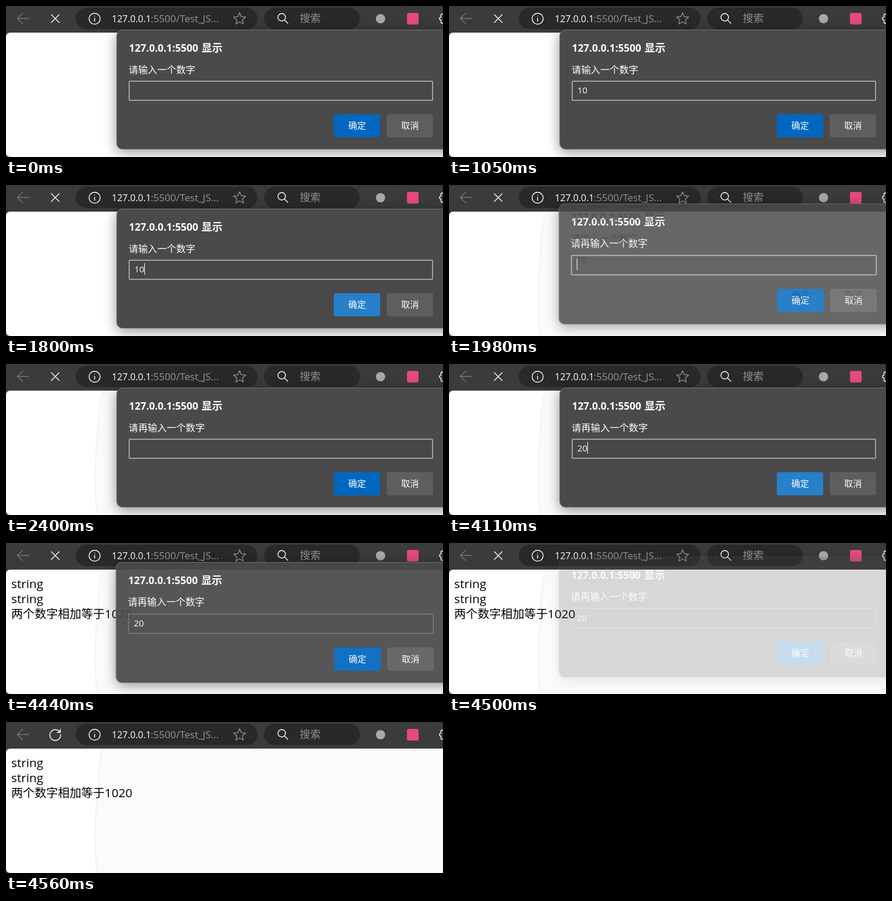
These frames come from a looping animation (752x261 px, 6 s). An HTML page:

```html
<!DOCTYPE html>
<html lang="zh">
<head>
<meta charset="utf-8">
<title>Prompt demo</title>
<style>
  html, body { margin: 0; width: 100%; height: 100%; overflow: hidden; background: #3b3b3b; }
  svg { display: block; width: 752px; height: 261px; }
  text { font-family: "Open Sans", "Noto Sans CJK SC", "Noto Sans CJK", sans-serif; white-space: pre; }
  .icon { fill: none; stroke: #fff; stroke-width: 1.4; stroke-linecap: round; stroke-linejoin: round; }
  .dim { stroke: #777; }
  .dialog { fill: #fff; transform-origin: 473px 144px; }
  .panel { fill: #4a4a4a; stroke: #747474; filter: drop-shadow(0 5px 11px rgba(0, 0, 0, .42)); }
  .field { fill: #474747; stroke: #9da0a6; stroke-width: 2; }
  .blurred .field { stroke: #747474; stroke-width: 1.5; }
  .cancel { fill: #5e5e5e; }
  .ghost { fill: #000; }
  .ghost :is(.panel, .field, .button) { display: none; }
</style>
</head>
<body>
<svg viewBox="0 0 752 261">
  <rect width="752" height="261" fill="#3b3b3b"/>
  <g fill="#292929">
    <rect x="120" y="3" width="313" height="37" rx="18.5"/>
    <rect x="444" y="3" width="165" height="37" rx="18.5"/>
  </g>
  <path class="icon dim" d="M39 21.5H20M28.500 12.500L19.500 21.500L28.500 30.500"/>
  <path class="icon" id="stop" d="M78 15L91.500 28.500M91.500 15L78 28.500"/>
  <path class="icon" id="reload" d="M92.500 17.500A9.300 9.300 0 1 0 94 22M93.500 12.500V18H88"/>
  <circle class="icon" cx="152.500" cy="22" r="9.500"/>
  <path class="icon" d="M152.500 21V26.500M152.500 17.500V17.600"/>
  <text x="182" y="28" font-size="16" fill="#fff">127.0.0.1</text>
  <text x="249" y="28" font-size="17.1" fill="#969696">:5500/Test_JS...</text>
  <path class="icon" id="star" style="stroke:#999;stroke-width:1.3"/>
  <circle class="icon" cx="474.500" cy="19.500" r="6.500"/>
  <path class="icon" d="M479.300 24.300L485 30"/>
  <text x="505.500" y="28" font-size="18" fill="#919191">搜索</text>
  <circle cx="644.500" cy="22" r="8" fill="#a8a8a8"/>
  <rect x="690" y="12" width="20" height="20" rx="3" fill="#e6487f"/>
  <path class="icon" d="M753 14H750Q748.500 14 748.500 16V19Q745.500 20 746 22Q746 24 748.500 24.500V28Q748.500 30 751 30H753"/>

  <path d="M0 54Q0 46 8 46H752V261H8Q0 261 0 253Z" fill="#fff"/>
  <path id="tint" d="M168 47C158 62 160 100 156 140S152 230 158 264H756V47" fill="#fbfbfb" stroke="#f5f5f5" stroke-width="3"/>
  <g id="output" font-size="20.8">
    <text x="9" y="77.500">string</text>
    <text x="9" y="103.500">string</text>
    <text x="9" y="129.500"><tspan font-size="20.100">两个数字相加等于</tspan>1020</text>
  </g>
  <g id="dialogs"></g>
</svg>
<script>
const LOOP = 6000, STEP = 30;
const $ = id => document.getElementById(id);
const show = (node, on) => { node.style.display = on ? '' : 'none'; };

$('star').setAttribute('d', 'M' + Array.from({ length: 10 }, (_, i) => {
  const angle = (i / 5 - 0.5) * Math.PI, r = i % 2 ? 5 : 10.8;
  return `${402 + r * Math.cos(angle)} ${22.5 + r * Math.sin(angle)}`;
}).join('L') + 'Z');

function makeDialog(message) {
  const root = document.createElementNS('http://www.w3.org/2000/svg', 'g');
  root.setAttribute('class', 'dialog');
  root.innerHTML = `
    <rect class="panel" x="190.5" y="41.5" width="580" height="206" rx="10"/>
    <text x="211.5" y="79" font-size="17.4" font-weight="700">127.0.0.1:5500 <tspan x="336.5" font-size="18">显示</tspan></text>
    <text x="211" y="115.500" font-size="16.4">${message}</text>
    <rect class="field" x="212" y="130" width="522" height="33" rx="1.5"/>
    <text class="value" x="221" y="151" font-size="15"></text>
    <rect class="caret" y="135" width="1" height="20"/>
    <rect class="button ok" x="564" y="187" width="80" height="40" rx="4"/>
    <rect class="button cancel" x="655" y="187" width="80" height="40" rx="4"/>
    <text x="589" y="212" font-size="15.2">确定</text>
    <text x="680" y="212" font-size="15.2">取消</text>`;
  const part = name => root.querySelector('.' + name);
  return { root, value: part('value'), caret: part('caret'), ok: part('ok') };
}

const first = makeDialog('请输入一个数字');
const second = makeDialog('请再输入一个数字');
$('dialogs').append(second.root, first.root);

// [vertical shift, opacity] per step
const CLOSING = [[-2, .97], [-7, .93], [-12, .55], [-16.5, .2], [-19, .08]];
const OPENING = [[-16, .3], [-12, .6], [-8, .83], [-5, .9], [-3, .96], [-1, .99]];

// [time, value], held until the next entry
const FIRST = {
  value: [[0, ''], [360, '1'], [540, '10']],
  caret: [[0, 0], [90, 1], [1050, 0], [1560, 1], [1950, 0]],
  ok: [[0, '#0067c0'], [1710, '#0d70c4'], [1740, '#1a78c7'], [1800, '#2680ca']]
};
const SECOND = {
  value: [[0, ''], [2910, '2'], [3090, '20']],
  caret: [[0, 1], [2400, 0], [2910, 1], [3600, 0], [4110, 1], [4380, 0]],
  ok: [[0, '#0067c0'], [4110, '#2680ca'], [4290, '#0067c0']]
};
const held = (track, t) => track.filter(([at]) => at <= t).pop()[1];

function pose(t, opens, closes) {
  if (t < opens) return [0, 0];
  if (t >= closes) return CLOSING[Math.floor((t - closes) / STEP)] || [0, 0];
  return OPENING[Math.floor((t - opens) / STEP)] || [0, 1];
}

function draw(dialog, tracks, t, [shift, opacity]) {
  const { root, value, caret, ok } = dialog;
  show(root, opacity > 0);
  const grow = Math.min(1, -shift / 8);
  root.style.opacity = opacity;
  root.style.transform = shift
    ? `translateY(${shift}px) scale(${1 + .005 * grow}, ${1 + .01 * grow})` : 'none';
  const typed = held(tracks.value, t);
  value.textContent = typed;
  caret.setAttribute('x', [221, 230, 238][typed.length]);
  show(caret, held(tracks.caret, t));
  ok.setAttribute('fill', held(tracks.ok, t));
}

function render(time) {
  const t = Math.floor((time % LOOP) / STEP) * STEP;
  draw(first, FIRST, t, pose(t, -1000, 1890));
  draw(second, SECOND, t, pose(t, 1920, 4410));
  first.root.classList.toggle('ghost', t >= 1980);
  second.root.classList.toggle('blurred', t >= 4380);
  show($('tint'), t >= 1950);
  show($('output'), t >= 4380);
  show($('stop'), t < 4560);
  show($('reload'), t >= 4560);
}

const start = performance.now();
function tick() {
  render(performance.now() - start);
  requestAnimationFrame(tick);
}
tick();
</script>
</body>
</html>
```
